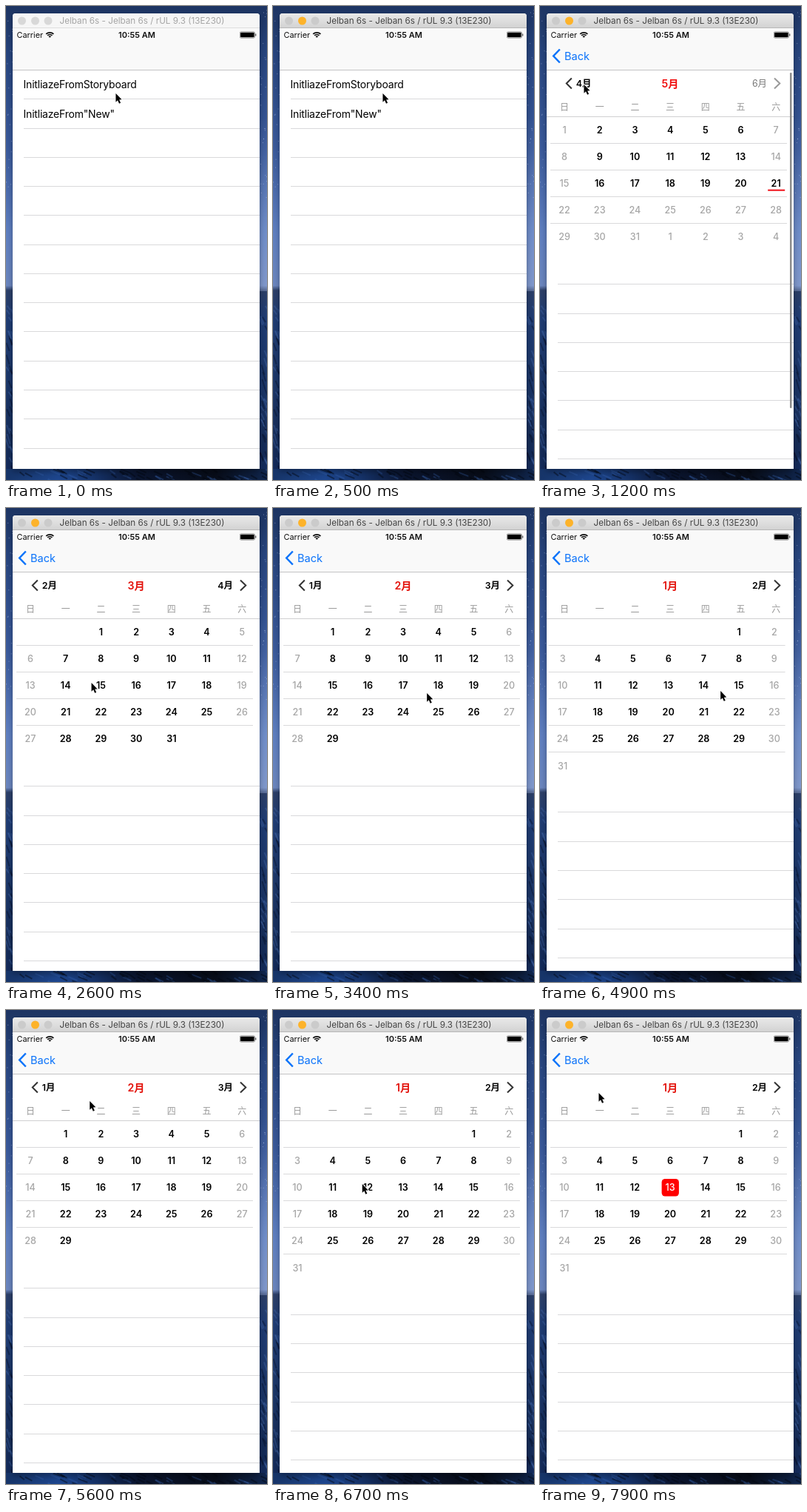
An HTML page with a canvas for the animation above (8 s loop, 353x640 px).

```html
<!DOCTYPE html>
<html lang="en">
<head>
<meta charset="utf-8">
<title>Calendar demo</title>
<style>
html, body { margin: 0; width: 100%; height: 100%; overflow: hidden; background: #14264f; }
canvas { display: block; width: 353px; height: 640px; }
</style>
</head>
<body>
<canvas id="stage"></canvas>
<script>
const W = 353, H = 640, LOOP = 8000;
const LEFT = 9, RIGHT = 343, PAGE = RIGHT - LEFT, BOTTOM = 625, NAV = 87;
const ROW = 39.27, DAY = 36.1, COL = 47.7;
const FONT = 'Inter, "Noto Sans CJK SC", "Noto Sans CJK JP", "Noto Sans CJK", sans-serif';
const LINE = '#d9d9db', GRAY = '#a6a6a6', BLUE = '#0a72fa', RED = '#e3120b';

const canvas = document.getElementById('stage');
const c = canvas.getContext('2d');
const dpr = window.devicePixelRatio || 1;
canvas.width = W * dpr;
canvas.height = H * dpr;

// time, x, y of the pointer
const pointer = [
  [0, 148, 118], [720, 148, 118], [1150, 59, 106], [2050, 59, 106],
  [2600, 115, 236], [2760, 130, 245], [3100, 295, 250], [3600, 150, 250],
  [3930, 150, 252], [4200, 325, 255], [4400, 330, 256], [4820, 290, 250],
  [5100, 130, 240], [5600, 113, 123], [5850, 59, 106], [6250, 59, 106],
  [6700, 120, 235], [6900, 175, 241], [7250, 175, 241], [7900, 79, 112], [8000, 79, 112]
];
// start, duration, month before, month after
const scrolls = [
  [1350, 300, 5, 4], [1850, 300, 4, 3], [2800, 420, 3, 2],
  [3951, 480, 2, 1], [4880, 420, 1, 2], [5950, 300, 2, 1]
];
const PUSH = 620, PUSH_TIME = 420, SELECT = 7000;

const clamp = v => Math.max(0, Math.min(1, v));
const mix = (a, b, k) => a + (b - a) * k;
const ease = k => { k = clamp(k); return k * k * (3 - 2 * k); };

function text(s, x, y, size, color, weight = 400, align = 'left', spacing = 0) {
  c.font = `${weight} ${size}px ${FONT}`;
  c.letterSpacing = spacing + 'px';
  c.textAlign = align;
  c.fillStyle = color;
  c.fillText(s, x, y);
}

function rect(x, y, w, h, color) {
  c.fillStyle = color;
  c.fillRect(x, y, w, h);
}

function rounded(x, y, w, h, r, color) {
  c.fillStyle = color;
  c.beginPath();
  c.roundRect(x, y, w, h, r);
  c.fill();
}

function path(points, color, width) {
  c.beginPath();
  points.forEach(([x, y]) => c.lineTo(x, y));
  c.strokeStyle = color;
  c.lineWidth = width;
  c.stroke();
}

const rule = (x1, x2, y, color = LINE) => rect(x1, Math.floor(y), x2 - x1, 1, color);

function gradient(y1, y2, stops) {
  const g = c.createLinearGradient(0, y1, 0, y2);
  stops.forEach(([k, color]) => g.addColorStop(k, color));
  return g;
}

function clipped(x, y, w, h, draw) {
  c.save();
  c.beginPath();
  c.rect(x, y, w, h);
  c.clip();
  draw();
  c.restore();
}

function wallpaper() {
  rect(0, 0, W, H, gradient(0, H, [
    [0, '#1d3462'], [.1, '#27457f'], [.3, '#3a5a9c'], [.48, '#5f80c2'], [.59, '#6b86bf'],
    [.6, '#2c3f68'], [.66, '#1f3c74'], [.8, '#1b3668'], [.92, '#152c58'], [1, '#122a5c']
  ]));
  rect(RIGHT, 0, W - RIGHT, 385, gradient(150, 385, [[0, 'rgba(160,180,225,0)'], [1, 'rgba(160,180,225,.4)']]));
  let seed = 7;
  const rnd = () => (seed = seed * 16807 % 2147483647) / 2147483647;
  for (let i = 0; i < 50; i++) {
    const x = rnd() < .5 ? rnd() * 9 : RIGHT + rnd() * 10;
    rect(x, rnd() * 260, 1, 1, 'rgba(210,225,255,.45)');
  }
  // rock facets beside the window
  for (let i = 0; i < 60; i++) {
    const x = rnd() < .5 ? rnd() * 7 : RIGHT + rnd() * 8;
    const y = 392 + rnd() * 230;
    path([[x, y], [x + 4, y + 5 + rnd() * 9]], rnd() < .5 ? 'rgba(75,115,185,.3)' : 'rgba(5,14,38,.4)', 2);
  }
  // lit slope on the left, black rock on the right
  const ground = c.createLinearGradient(0, 0, W, 0);
  [[0, '#163468'], [.2, '#1d468e'], [.32, '#16356e'], [.5, '#0a1530'], [.8, '#070c18'], [1, '#10264e']]
    .forEach(([k, color]) => ground.addColorStop(k, color));
  rect(0, BOTTOM, W, H - BOTTOM, ground);
  for (let i = 0; i < 60; i++) {
    const x = rnd() * W, y = BOTTOM + rnd() * 15;
    path([[x, y], [x + 6 + rnd() * 8, y + 5]], rnd() < .35 ? 'rgba(60,105,185,.3)' : 'rgba(2,6,16,.45)', 2);
  }
  c.save();
  c.shadowColor = 'rgba(0,0,0,.35)';
  c.shadowBlur = 8 * dpr;
  c.shadowOffsetY = 4 * dpr;
  rounded(LEFT, 10, PAGE, BOTTOM - 10, [4, 4, 0, 0], '#fff');
  c.restore();
}

function titleBar(active) {
  const fill = active ? gradient(10, 30, [[0, '#e9e9e9'], [1, '#d2d2d2']]) : '#f6f6f6';
  rounded(LEFT, 10, PAGE, 20, [4, 4, 0, 0], fill);
  rule(LEFT, RIGHT, 29, active ? '#b8b8b8' : '#dedede');
  [21.5, 39.5, 57].forEach((x, i) => {
    c.beginPath();
    c.arc(x, 20, 5.5, 0, 7);
    c.fillStyle = !active ? '#d8d8d8' : i === 1 ? '#fdb32a' : '#cbcbcb';
    c.fill();
  });
  text('Jelban 6s - Jelban 6s / rUL 9.3 (13E230)', 184, 24.3, 11.7, active ? '#444' : '#a5a5a5', 400, 'center');
}

function statusBar() {
  text('Carrier', 14.5, 43, 10.9, '#111');
  text('10:55 AM', 177, 43, 11, '#111', 600, 'center');
  for (const r of [2.2, 5, 7.8]) {
    c.beginPath();
    c.arc(59.3, 43, r - .6, -Math.PI * .75, -Math.PI * .25);
    c.strokeStyle = '#111';
    c.lineWidth = 1.8;
    c.stroke();
  }
  rounded(316, 34.5, 20.8, 9, 2, '#777');
  rounded(316.6, 35.1, 19.6, 7.8, 1.5, '#ddd');
  rounded(317.2, 35.7, 18.4, 6.6, 1, '#000');
  rect(337.3, 37.5, 1, 3, '#333');
}

function navBar(k) {
  rect(LEFT, 30, PAGE, NAV - 30, '#f9f9f9');
  statusBar();
  c.globalAlpha = k;
  path([[26.8, 58.5], [18.2, 67.5], [26.8, 76.5]], BLUE, 2.5);
  text('Back', 33 + 60 * (1 - k), 72.8, 14.6, BLUE);
  c.globalAlpha = 1;
  rule(LEFT, RIGHT, 86.5, '#c3c3c5');
}

function emptyRows(y) {
  for (; y < BOTTOM; y += ROW) rule(24, RIGHT, y);
}

function list(pressed) {
  rect(LEFT, NAV, PAGE, BOTTOM - NAV, '#fff');
  if (pressed) rect(LEFT, NAV, PAGE, ROW, '#d9d9d9');
  text('InitliazeFromStoryboard', 23.5, 111.3, 14, '#000', 400, 'left', -.2);
  text('InitliazeFrom"New"', 23.5, 150.5, 14, '#000', 400, 'left', -.2);
  emptyRows(125.8);
}

const firstDay = m => new Date(2016, m - 1, 1).getDay();
const dayCount = m => new Date(2016, m, 0).getDate();
const rowCount = m => Math.ceil((firstDay(m) + dayCount(m)) / 7);

function monthPage(m, shift, picked) {
  const first = firstDay(m), count = dayCount(m), rows = rowCount(m);
  for (let r = 1; r < rows; r++) rule(14 + shift, 334 + shift, 149.3 + DAY * r);
  const cells = m === 5 ? rows * 7 - first : count;
  for (let d = 1; d <= cells; d++) {
    const cell = first + d - 1, col = cell % 7;
    const x = 33 + COL * col + shift, y = 167.5 + DAY * Math.floor(cell / 7);
    const today = m === 5 && d === 21;
    const open = today || col % 6 && !(m === 5 && d > 21);
    const chosen = picked && m === 1 && d === 13;
    if (chosen) rounded(x - 11.5, y - 11.7, 23.3, 23.5, 4.5, '#f00');
    if (today) rect(x - 11, y + 8, 23, 2, '#f01018');
    text(d > count ? d - count : d, x, y + 4.5, 12.6,
      chosen ? '#fff' : open ? '#000' : GRAY, open && !chosen ? 600 : 500, 'center');
  }
}

function monthHeader(m) {
  if (m > 1) {
    path([[42.8, 97.5], [35.8, 104.5], [42.8, 111.5]], '#333', 2);
    text(m - 1 + '月', 48.7, 109, 12.4, '#000', 600);
  }
  text(m + '月', 176, 109.5, 14.2, m === 5 ? '#f00d0d' : RED, 600, 'center');
  const end = m === 5;
  text(m + 1 + '月', 307, 109, 12.4, end ? '#777' : '#000', end ? 400 : 600, 'right');
  path([[317, 97.5], [324.3, 104.5], [317, 111.5]], end ? '#999' : '#333', 2);
  [...'日一二三四五六'].forEach((s, i) => text(s, 33 + COL * i, 140.5, 12, '#999', 400, 'center'));
  rule(LEFT, RIGHT, 149.5, '#cfcfd1');
}

function calendar(t) {
  let pos = 5;
  for (const [start, time, a, b] of scrolls) {
    if (t >= start) pos = mix(a, b, ease((t - start) / time));
  }
  const low = Math.floor(pos), k = pos - low;
  rect(LEFT, NAV, PAGE, BOTTOM - NAV, '#fff');
  monthHeader(Math.round(pos));
  clipped(LEFT, 150, PAGE, BOTTOM - 150, () => {
    monthPage(low, -k * PAGE, t >= SELECT);
    if (k) monthPage(low + 1, (1 - k) * PAGE);
  });
  const rows = k ? mix(rowCount(low), rowCount(low + 1), k) : rowCount(low);
  emptyRows(375.9 + (rows - 5) * 35.3);
  const bar = clamp((1750 - t) / 250);
  if (bar) {
    c.globalAlpha = bar;
    rounded(338, 90, 2.5, 453, 1.2, '#8c8c8c');
    c.globalAlpha = 1;
  }
}

function cursor(t) {
  const i = pointer.findIndex(p => p[0] > t);
  const a = pointer[i - 1], b = pointer[i];
  const k = (t - a[0]) / (b[0] - a[0]);
  c.save();
  c.translate(mix(a[1], b[1], k), mix(a[2], b[2], k));
  c.scale(.93, .93);
  c.beginPath();
  [[.5, 0], [.5, 12.6], [3.3, 10], [5.4, 14.8], [7.6, 13.8], [5.5, 9.2], [9.2, 9]].forEach(p => c.lineTo(...p));
  c.closePath();
  c.strokeStyle = '#fff';
  c.lineWidth = 1.8;
  c.stroke();
  c.fillStyle = '#000';
  c.fill();
  c.restore();
}

function draw(t) {
  c.setTransform(dpr, 0, 0, dpr, 0, 0);
  wallpaper();
  const k = 1 - (1 - clamp((t - PUSH) / PUSH_TIME)) ** 3;
  clipped(LEFT, NAV, PAGE, BOTTOM - NAV, () => {
    if (k < 1) {
      c.save();
      c.translate(-k * PAGE * .3, 0);
      list(t >= 520);
      c.restore();
      rect(LEFT, NAV, PAGE, BOTTOM - NAV, `rgba(0,0,0,${k * .1})`);
    }
    if (k > 0) {
      c.translate((1 - k) * PAGE, 0);
      calendar(t);
    }
  });
  navBar(k);
  titleBar(t >= 450);
  cursor(t);
}

function frame(now) {
  draw(now % LOOP);
  requestAnimationFrame(frame);
}
draw(0);
requestAnimationFrame(frame);
</script>
</body>
</html>
```
